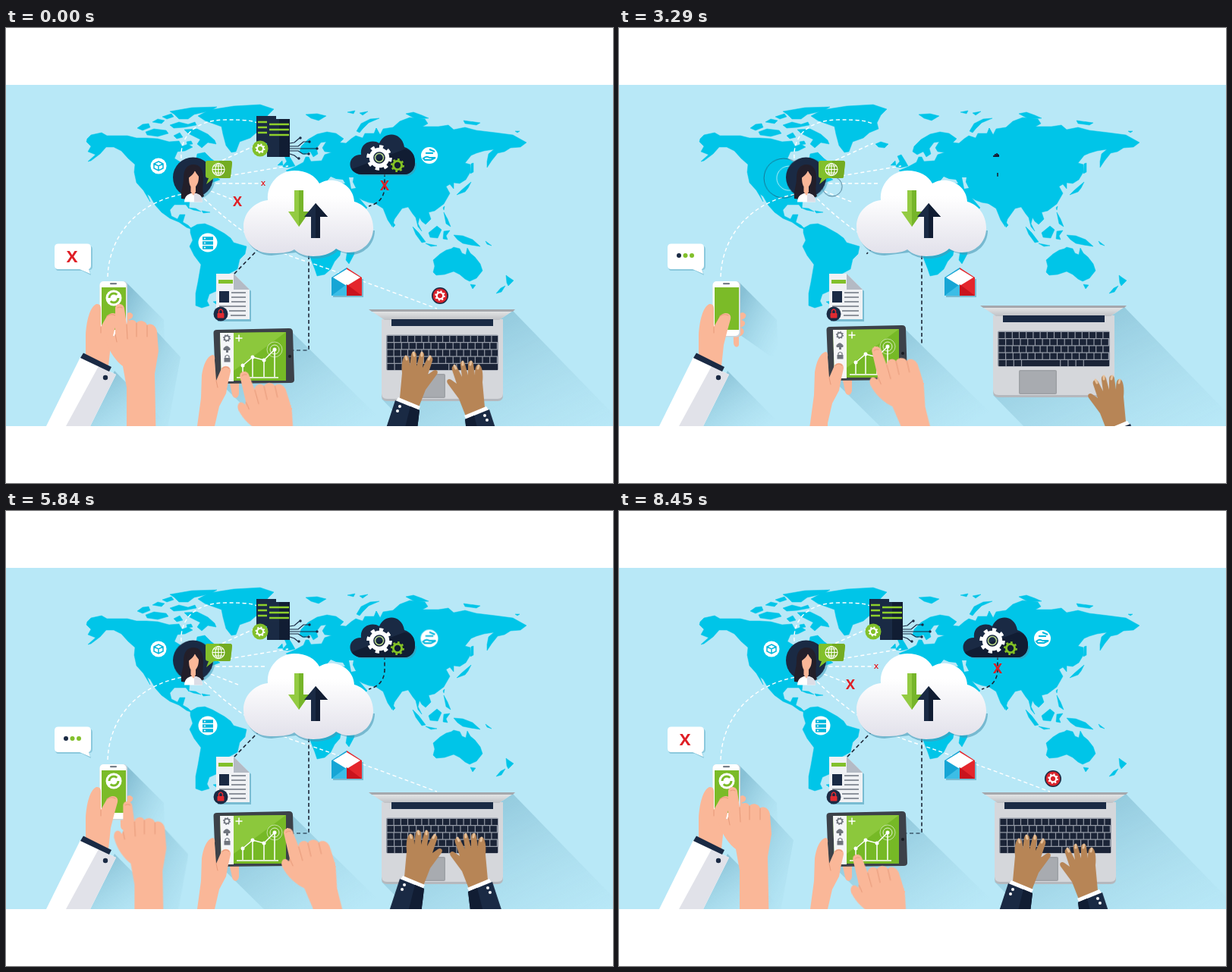
Animation of 800x600 px, one loop 8.48 s. Source, as an HTML page:

```html
<!DOCTYPE html>
<html lang="en">
<head>
<meta charset="utf-8">
<title>Connected world</title>
<style>
html,body{margin:0;width:100%;height:100%;overflow:hidden;background:#fff}
svg{display:block;width:100%;height:100%}
.pop{transform-box:fill-box;transform-origin:center}
.base{transform-origin:50% 100%}
.map{fill:#00c5e8;stroke:#00c5e8;stroke-width:.5;stroke-linejoin:round}
.dash{fill:none;stroke:#fff;stroke-width:1.4;stroke-dasharray:5 3.5}
.dark{stroke:#1c2536;stroke-width:1.6}
.wipe{fill:none;stroke:#fff;stroke-width:8;stroke-dasharray:500 1000}
.x{font:bold 18px "Open Sans","Liberation Sans",sans-serif;fill:#df1f26;text-anchor:middle}
.skin{fill:#fab798}
.fold{fill:none;stroke:#e89c7c;stroke-width:1.1;stroke-linecap:round}
.brown{fill:#b78556}
.navy{fill:#1a2a44}
.deep{fill:#111d33}
.green{fill:#82c02b}
.white{fill:#fff}
.line{fill:none;stroke:#fff;stroke-width:1.5}
.shade{fill:url(#cast)}
</style>
</head>
<body>
<svg viewBox="0 0 800 600">
<defs>
  <clipPath id="band"><rect y="75" width="800" height="450"/></clipPath>
  <linearGradient id="cast" x1="0" y1="0" x2="1" y2="1"><stop offset=".1" stop-color="#5f9fb9" stop-opacity=".55"/><stop offset=".9" stop-color="#8fc8dc" stop-opacity="0"/></linearGradient>
  <linearGradient id="fluff" x1="0" y1="0" x2="0" y2="1"><stop offset=".3" stop-color="#fff"/><stop offset="1" stop-color="#e1e0ea"/></linearGradient>
  <linearGradient id="metal" x1="0" y1="0" x2="0" y2="1"><stop offset="0" stop-color="#eceded"/><stop offset="1" stop-color="#bfc1c5"/></linearGradient>
  <g id="gear" fill="none" stroke="currentColor">
    <circle r="6.6" stroke-width="3.4"/>
    <circle r="9" stroke-width="3" pathLength="16" stroke-dasharray=".9 1.1"/>
  </g>
  <g id="point">
    <path class="skin" d="M-6,6C-6,-2 5,-2 6,6L9,27C10,20 20,19 22,25C25,20 35,22 36,28C41,24 48,29 49,36L51,62L46,92L50,300H9V110L4,82C-4,76 -14,64 -18,48C-19,38 -11,36 -8,43L-6,40Z"/>
    <path class="fold" d="M9,27L10,46M22,25V43M36,28V43M-6,40L-4,50M-3,5Q0,3 3,5"/>
  </g>
  <g id="typist">
    <path class="brown" d="M519,488L522,455C521,445 522,433 527,432C532,432 532,440 532,446L534,431C535,425 541,426 541,432V446L545,431C547,425 552,427 551,433L549,448L555,436C558,430 564,434 562,439L556,457L563,452C568,449 571,454 567,458L553,477L544,500Z"/>
    <path d="M527,433l1,4M537,428l1,4M548,428v4M559,433l-2,4" stroke="#e7c29c" stroke-width="3" stroke-linecap="round"/>
    <path class="white" d="M517,487L546,499L543,505L513,493Z"/>
    <path class="navy" d="M513,491L545,504L537,570H487Z"/>
    <path class="deep" d="M533,499L545,504L537,570H515Z"/>
    <circle class="white" cx="519" cy="499" r="2"/><circle class="white" cx="516" cy="505" r="2"/>
  </g>
  <path id="toPhone" d="M134,328C136,270 178,226 240,218"/>
  <path id="toTop" d="M231,172C229,142 250,121 290,121S325,124 335,126"/>
  <path id="toRack" d="M262,185L335,152"/>
  <path id="toNorth" d="M268,199L372,182"/>
  <path id="toEast" d="M268,205H343"/>
  <path id="toSouth" d="M262,212L306,229"/>
  <path id="toLaptop" d="M255,219C300,264 340,290 390,306S530,356 568,370"/>
  <path id="toDoc" d="M334,290L300,325"/>
  <path id="toTablet" d="M399,300V425H378"/>
  <path id="toDark" d="M499,191V210Q498,230 478,235"/>
  <mask id="whiteMask" maskUnits="userSpaceOnUse" x="0" y="0" width="800" height="600">
    <g class="wipe"><use href="#toPhone" id="w1"/><use href="#toTop" id="w2"/><use href="#toRack" id="w3"/><use href="#toNorth" id="w4"/><use href="#toEast" id="w5"/><use href="#toSouth" id="w6"/><use href="#toLaptop" id="w7"/></g>
  </mask>
  <mask id="darkMask" maskUnits="userSpaceOnUse" x="0" y="0" width="800" height="600">
    <g class="wipe"><use href="#toDoc" id="w8"/><use href="#toTablet" id="w9"/><use href="#toDark" id="w10"/></g>
  </mask>
</defs>

<g clip-path="url(#band)">
<rect y="75" width="800" height="450" fill="#b8e8f7"/>

<g id="world" class="pop"><g class="map">
  <path d="M107,146L112,141 126,138 133,142 145,142 160,142 172,145 185,145 200,146 215,150 228,149 232,156 240,153 246,157 236,162 226,163 222,172 232,178 243,184 250,176 252,166 262,164 270,172 278,178 288,190 275,195 282,200 268,205 258,215 250,220 242,228 241,238 237,233 222,233 216,240 218,248 226,252 229,246 236,246 233,256 240,260 246,266 238,263 228,256 216,251 205,243 197,234 190,222 186,219 190,229 181,214 172,204 169,190 170,180 161,172 152,162 142,157 132,157 124,166 112,175 108,176 118,167 108,163 112,156 106,150Z"/>
  <path d="M173,132L180,127 188,126 190,131 180,135ZM184,137L195,133 211,135 214,139 200,143 186,141ZM193,124L200,120 209,122 205,126ZM206,117L218,113 221,117 212,120ZM216,110L245,105 278,104 270,109 248,114 240,120 228,120 222,114ZM216,128L228,124 240,127 249,124 251,128 235,131 221,132ZM235,134L252,133 266,140 275,148 277,153 266,151 258,158 252,153 256,147 240,139ZM221,142L229,138 233,144 225,146ZM238,150L244,149 246,153 239,154Z"/>
  <path d="M253,116L268,108 300,103 335,101 353,107 345,115 340,125 342,133 330,138 322,145 308,150 303,163 297,164 290,155 286,140 284,130 270,125 262,122ZM338,153L345,150 355,153 350,158 342,157Z"/>
  <path d="M243,264L252,259 262,258 272,262 288,271 296,277 300,283 317,288 315,298 308,305 305,318 292,325 288,335 278,340 277,347 268,351 265,360 268,366 258,369 250,366 250,350 253,335 257,312 248,300 242,288 246,280 243,270ZM273,361L280,360 277,364ZM240,237L250,238 257,242 247,240ZM258,241L269,243 260,244Z"/>
  <path d="M356,217L372,211 384,210 388,217 400,222 408,219 424,222 430,234 440,250 446,256 460,254 456,262 445,278 442,290 440,300 433,308 428,318 420,325 410,327 407,318 400,300 402,288 396,276 397,268 390,264 376,264 362,266 354,258 349,248 351,235ZM450,293L459,289 459,298 452,311 448,306Z"/>
  <path d="M362,211L363,199 376,200 376,192 369,188 381,183 392,177 395,170 399,170 402,176 416,175 420,167 429,164 420,163 417,158 422,150 415,151 409,159 411,166 405,170 401,163 393,167 387,163 389,156 398,147 410,140 423,137 435,139 445,146 440,151 448,152 455,146 461,142 470,145 473,139 485,139 488,132 493,141 500,170 500,236 490,232 478,230 470,227 465,224 476,237 465,247 450,255 444,243 432,222 431,214 418,213 409,213 405,206 402,216 395,205 388,200 396,210 393,214 383,202 375,204 372,211Z"/>
  <path d="M486,139L488,132 493,141 497,133 510,131 519,123 532,118 552,120 556,126 549,130 570,130 583,128 590,134 605,131 620,135 645,138 668,141 686,151 678,157 665,158 657,163 648,165 640,175 634,184 634,176 636,166 643,160 630,162 620,165 613,168 605,178 612,180 612,190 606,200 598,205 590,204 590,212 585,206 580,209 585,218 577,232 565,241 557,243 560,252 553,259 548,255 545,250 543,258 548,268 543,262 540,250 536,245 530,236 522,238 512,252 509,262 503,253 497,238 486,231Z"/>
  <path d="M364,183L370,176 367,169 372,167 377,175 381,182 372,184ZM358,181L364,175 365,181ZM395,114L410,113 422,116 412,122 402,119ZM450,111L460,109 458,113ZM466,112L477,110 470,115ZM462,136L468,126 480,120 492,119 478,125 470,133 466,138ZM527,113L537,111 548,115 557,119 540,120ZM603,122L625,125 620,128 605,126ZM671,136L677,136 674,138Z"/>
  <path d="M613,179L616,178 616,190 612,192ZM607,208L613,203 609,211 605,216 594,220 600,214ZM576,237L578,235 577,240ZM577,243L582,252 586,262 580,258ZM536,262L544,270 553,282 548,283 540,272ZM553,284L568,287 560,288ZM557,270L568,261 574,266 569,277 559,276ZM577,268L585,267 580,274 582,279 576,278ZM590,273L602,274 615,279 625,288 612,286 602,284 595,279ZM632,281L640,287 634,285ZM510,256L513,260 510,263Z"/>
  <path d="M563,306L572,298 580,293 587,291 590,289 598,291 601,297 606,299 608,290 612,297 618,302 625,311 628,320 620,330 611,334 605,331 598,325 590,321 578,325 567,326 563,322 565,314ZM612,338L619,339 615,344ZM659,326L663,329 669,333 662,340 660,336ZM658,340L653,348 646,350 652,343Z"/>
</g>
<path d="M423,202L428,196 435,199 444,200 447,205 436,204ZM452,197L458,197 457,203 461,211 455,212Z" fill="#b8e8f7"/></g>

<g class="dash" mask="url(#whiteMask)"><use href="#toPhone"/><use href="#toTop"/><use href="#toRack"/><use href="#toNorth"/><use href="#toEast"/><use href="#toSouth"/><use href="#toLaptop"/></g>
<g class="dash dark" mask="url(#darkMask)"><use href="#toDoc"/><use href="#toTablet"/><use href="#toDark"/></g>

<g id="orbit" class="pop" fill="none" stroke="#25536e" stroke-width=".7"><circle cx="217" cy="198" r="26"/><circle cx="281" cy="209" r="13"/><circle cx="224" cy="198" r="16" stroke="#fff"/></g>
<g id="disc" class="pop"><circle cx="249" cy="200" r="26" fill="#4ba6c4" opacity=".6"/><circle class="navy" cx="246.500" cy="197" r="26.500"/></g>
<g id="woman" class="pop base">
  <path d="M231,225C230,214 234,208 234,198C234,186 239,180 247,180C256,180 260,187 260,198C260,208 258,214 261,222L252,226H238Z" fill="#231f2a"/>
  <path class="white" d="M235,229.500C235,222 240,219 244,218H250C255,219 259,222 259,229.500Z"/>
  <path d="M248,218H250C255,219 259,222 259,229.500H248Z" fill="#dcdde6"/>
  <path class="skin" d="M241,196C241,186 254,186 254,196C254,203 252,207 250,209V216L247,221 243.500,216V209C242,207 241,203 241,196Z"/>
  <path d="M238,203C238,197 246,196 249,188C251,194 256,195 256,203L259,191 253,183 245,182 237,190Z" fill="#231f2a"/>
</g>
<g id="talk" class="pop"><path class="green" d="M265,175H295Q298,175 298,178L296,196Q296,198 293,198H274L264,206 267,198Q263,198 263,195V178Q263,175 265,175Z"/><path d="M281,175H295Q298,175 298,178L296,196Q296,198 293,198H281Z" fill="#74ac22"/><g class="line" style="stroke-width:1.1"><circle cx="280" cy="186.500" r="8"/><ellipse cx="280" cy="186.500" rx="4" ry="8"/><path d="M272,186.500H288M280,178.500V194.500M273.500,182H286.500M273.500,191H286.500"/></g></g>

<g id="rack" class="pop">
  <path class="navy" d="M330,116H356V152H330ZM344,120H374V170H344Z"/><path class="deep" d="M360,120H374V170H360Z"/>
  <path d="M332,124H344M332,131H344M332,138H344M347,127H373M347,134H373M347,141H373" stroke="#8fd02c" stroke-width="2.500"/>
  <circle class="green" cx="335" cy="159" r="10.500"/><use href="#gear" transform="translate(335 159) scale(.62)" color="#fff"/>
</g>
<g id="wires" fill="none" stroke="#17263f" stroke-width="1.200"><path d="M374,152L380,151 387,145M374,156H385L392,150H399M374,159H410M374,162H385L391,166H398M374,166L380,168 385,172"/><g class="navy" stroke="none"><circle cx="388" cy="145" r="1.700"/><circle cx="400" cy="150" r="1.700"/><circle cx="410" cy="159" r="1.700"/><circle cx="399" cy="166" r="1.700"/><circle cx="386" cy="172" r="1.700"/></g></g>

<g id="darkCloud" class="pop">
  <path d="M471,195L530,195C538,193 541,187 541,178L457,178Q457,194 471,195Z" fill="#4a93ac" opacity=".55"/>
  <path class="navy" d="M469,193C448,192 449,167 468,167C466,151 483,146 492,152C499,135 522,137 525,157C534,160 539,167 539,177C539,187 533,193 525,193Z"/>
  <path class="deep" d="M456,186L525,160C534,160 539,167 539,177C539,187 533,193 525,193H469C463,193 458,190 456,186Z"/>
</g>
<g id="cogs" class="pop"><use href="#gear" transform="translate(492 171) scale(1.600)" color="#fff"/><circle cx="492" cy="171" r="5.500" fill="none" stroke="#b9d98a" stroke-width="1.500"/><use href="#gear" transform="translate(516 181) scale(.85)" color="#84c225"/></g>

<g id="cloud" class="pop">
  <path d="M350,300C330,300 315,284 315,265L486,267C486,286 471,299 454,299L437,294C428,302 416,304 407,304Q390,303 382,296Z" fill="#4b99b6" opacity=".6"/>
  <path fill="url(#fluff)" d="M348,297C328,297 313,281 313,262C313,243 328,229 345,227C343,206 360,188 380,188C396,188 408,195 413,205C430,194 458,205 459,229C474,233 484,247 484,264C484,283 469,296 452,296C445,296 440,294 435,291C428,298 416,301 405,301C395,301 386,298 380,292C372,297 358,297 348,297Z"/>
</g>
<g id="arrows" class="pop">
  <path d="M380,214H392V242H400L386,262 372,242H380Z" fill="#93cb42"/><path d="M386,214H392V242H400L386,262Z" fill="#76b52a"/>
  <path class="navy" d="M402,277H414V249H424L408,231 393,249H402Z"/><path class="deep" d="M408,277H414V249H424L408,231Z"/>
</g>

<g id="doc" class="pop">
  <path d="M279,326H301L323,347V387H279Z" fill="#4f9eba" opacity=".6"/>
  <path d="M277,324H300L321,345V384H277Z" fill="#eff1f4"/><path d="M300,324L321,345H300Z" fill="#b4bac4"/>
  <path class="green" d="M280,332H299V337H280Z"/><path class="navy" d="M281,347H294V362H281Z"/>
  <path d="M297,349H316M297,355H316M297,361H316M281,367H316M294,373H316M296,379H316" stroke="#8d939c" stroke-width="2.200"/>
  <circle class="navy" cx="283" cy="377" r="9.500"/><rect x="278.500" y="376" width="9" height="6.500" rx="1" fill="#e12b31"/><path d="M280.500,376V373Q283,369 285.500,373V376" fill="none" stroke="#e12b31" stroke-width="1.500"/>
</g>

<g id="mail" class="pop">
  <path d="M431,331H471V355H431Z" fill="#4f9eba" opacity=".6"/>
  <path d="M429,329L449,316V353H429Z" fill="#16a5d5"/><path d="M449,316L469,329V353H449Z" fill="#e4262c"/>
  <path class="white" d="M431,329L449,318 467,329 449,340Z"/>
  <path d="M429,353L449,338V353Z" fill="#3cbde6"/><path d="M449,338L469,353H449Z" fill="#c9131d"/>
</g>

<g id="chat" class="pop"><path d="M69,287H109Q114,287 114,292V314Q114,319 110,319L112,326 100,320H69Q65,320 65,314V292Q65,287 69,287Z" fill="#6eb5cb" opacity=".6"/><path class="white" d="M69,284.500H107Q112,284.500 112,289.500V313Q112,317 109,318L111,324 97,318H69Q64,318 64,313V289.500Q64,284.500 69,284.500Z"/></g>
<g id="dots"><circle class="navy" cx="79" cy="300" r="3"/><circle class="green" cx="87.500" cy="300" r="3"/><circle class="green" cx="96" cy="300" r="3"/></g>
<text id="x1" class="x pop" x="87" y="308.500" style="font-size:22px">X</text>
<text id="x2" class="x pop" x="305" y="234.500">X</text>
<text id="x3" class="x pop" x="339" y="208" style="font-size:9px">X</text>
<text id="x4" class="x pop" x="499" y="213.500">X</text>

<g id="cube" class="pop"><circle class="white" cx="201" cy="182" r="10.500"/><path d="M201,176L207,179V185L201,188 195,185V179ZM195,179L201,182 207,179M201,182V188" fill="none" stroke="#00b6dc" stroke-width="1.500"/></g>
<g id="stack" class="pop"><circle class="white" cx="266" cy="283" r="12.500"/><path d="M259,277.500H273M259,283.500H273M259,289.500H273" stroke="#00b6dc" stroke-width="4.500"/><path d="M261,277.500H263M261,283.500H263M261,289.500H263" stroke="#fff" stroke-width="1.500"/></g>
<g id="offer" class="pop"><circle class="white" cx="558" cy="168" r="11"/><path d="M550,172Q554,168 558,171H566L560,174H552ZM553,165H563M558,160L565,163" fill="none" stroke="#00b6dc" stroke-width="2"/></g>
<g id="alert" class="pop"><circle class="navy" cx="572" cy="353" r="11"/><circle cx="572" cy="353" r="9.500" fill="#d9222b"/><use href="#gear" transform="translate(572 353) scale(.65)" color="#fff"/></g>

<g id="phone">
  <path class="shade" d="M159,336L208,385 210,440 160,405Z"/><path class="shade" d="M143,452L215,525H110Z"/>
  <path class="skin" d="M150,379L163,375C170,377 168,383 161,385C168,386 168,393 160,395C167,397 166,405 158,407V418C156,423 151,420 151,415Z"/>
  <rect x="123.500" y="334" width="36.500" height="73.500" rx="5" fill="#c9d5dd"/><rect x="123.500" y="334" width="35" height="72" rx="5" fill="#fff"/>
  <rect x="126" y="342" width="32" height="56" fill="#7bbb28"/><rect x="137" y="336" width="9" height="2.200" rx="1" fill="#777f89"/>
  <g id="sync" class="pop"><circle class="white" cx="142" cy="356" r="10.500"/><circle cx="142" cy="356" r="6" fill="none" stroke="#7bbb28" stroke-width="3" pathLength="8" stroke-dasharray="3 1"/></g>
  <path class="skin" d="M105,432L105,405C106,388 110,368 119,364Q125,363 125,370V394L133,380C139,373 149,376 147,384L142,402 138,418 135,446Z"/>
  <path class="fold" d="M125,394V402M133,380Q138,376 144,379"/>
  <path class="white" d="M98,434L145,457 111,525H53Z"/><path d="M122,446L145,457 111,525H79Z" fill="#e1e2e9"/>
  <path class="navy" d="M102,428.500L139,447 136,453 98,435Z"/><circle class="navy" cx="131" cy="461" r="3.200"/>
</g>
<g id="tapper"><path class="shade" d="M43,30L80,70 60,180H10Z"/><use href="#point"/></g>

<g id="tablet">
  <path class="shade" d="M378,402L490,512 480,535H350L282,468Z"/>
  <path class="skin" d="M294,464H307V482C306,490 299,489 298,483Z"/>
  <path d="M278,398L373,396Q378,396 378,401L380,464Q380,468 375,468L281,469Q276,469 276,465L273.500,402Q273.500,398 278,398Z" fill="#3c4149"/>
  <path d="M282,402L369,401V465H284Z" fill="#76b926"/><path d="M300,402L369,401 300,452Z" fill="#8cc83c"/><path d="M282,402H300V466H284Z" fill="#f5f6f8"/>
  <use href="#gear" transform="translate(291 409) scale(.48)" color="#70757e"/>
  <path d="M287,425a2.500,2.500 0 0 1 1-4a3.500,3.500 0 0 1 6,0a2.500,2.500 0 0 1 1,4ZM290,424h3v4h-3ZM287.500,435h8v5.500h-8Z" fill="#70757e"/><path d="M289,435v-2q2.500,-3 5,0v2" fill="none" stroke="#70757e" stroke-width="1.200"/>
  <path class="line" d="M307,404.500V413.500M302.500,409H311.500"/><circle cx="374" cy="433" r="2" fill="#171b22"/>
  <g class="line"><circle cx="354" cy="424" r="10" style="stroke-width:.8" opacity=".7"/><circle cx="354" cy="424" r="6" style="stroke-width:.8"/><path d="M354,424V460M304,461H359"/></g><circle class="white" cx="354" cy="424" r="2.500"/>
  <g id="chart" class="pop base"><path class="line" d="M312,446V460M325,435V460M340,439V460M312,445L325,434 340,438 354,424"/><circle class="white" cx="312" cy="445" r="2.500"/><circle class="white" cx="325" cy="434" r="2.500"/><circle class="white" cx="340" cy="438" r="2.500"/></g>
  <path class="skin" d="M252,525L257,488 258,458C260,444 265,433 272,431Q276,431 275,438L277,465 284,449C288,443 297,446 296,453L293,466 290,482 281,499 275,525V600H240Z"/>
  <path class="fold" d="M277,465L279,474M285,449Q290,445 294,449"/>
  <circle id="tap1" class="line pop" cx="293" cy="410" r="13" style="stroke-width:12" pathLength="20" stroke-dasharray=".4 2.100"/>
  <circle id="tap2" class="line pop" cx="354" cy="423" r="15" style="stroke-width:7" pathLength="20" stroke-dasharray=".5 2"/>
</g>
<g id="swiper"><g transform="rotate(-13)"><use href="#point"/></g></g>

<g id="laptop">
  <path class="shade" d="M668,373L830,540H545L495,489Z"/>
  <path d="M495,384H655V485Q655,492 648,492H502Q495,492 495,485Z" fill="#b5b8bd"/><path d="M495,384H655V482Q655,489 648,489H502Q495,489 495,482Z" fill="#d5d7db"/>
  <path d="M478,371H671L650,385H499Z" fill="url(#metal)"/><path d="M478,371H671L668,374H482Z" fill="#a5a8ad"/>
  <path class="navy" d="M508,384H642V393H508Z"/>
  <rect x="501" y="404.500" width="148" height="47" rx="2" fill="#949aa6"/>
  <g fill="none" stroke="#1b2437" stroke-width="8"><path stroke-dasharray="8 1.200" d="M502.500,410H648M502.500,428.500H648"/><path stroke-dasharray="8.500 1.200" d="M502.500,419.200H648M502.500,437.700H648"/><path stroke-dasharray="9 1.200 9 1.200 9 1.200 50 1.200" d="M502.500,447H648"/></g>
  <rect x="529" y="456" width="50" height="32" rx="2" fill="#9da0a5"/><rect x="530.500" y="457.500" width="47" height="29" rx="1" fill="#a8abb0"/>
</g>
<g id="left"><use href="#typist"/></g>
<g id="right"><use href="#typist" transform="translate(1150 12) scale(-1 1)"/></g>
</g>
</svg>
<script>
const LOOP = 8480, HOLD = 500;
let css = '';

// Each cycle begins when the still picture clears; steps are [ms, declarations].
function track(id, steps) {
  const at = ms => ((ms - HOLD) / LOOP * 100).toFixed(3) + '%';
  const frames = [[HOLD, steps[0][1]], ...steps, [HOLD + LOOP, steps[steps.length - 1][1]]];
  css += `@keyframes ${id}{${frames.map(([ms, d]) => `${at(ms)}{${d}}`).join('')}}` +
    `#${id}{animation:${id} ${LOOP}ms ease-in-out -${LOOP - HOLD}ms infinite}`;
}
const move = (id, steps) => track(id, steps.map(([ms, x, y]) => [ms, `transform:translate(${x}px,${y}px)`]));
const fade = (id, steps) => track(id, steps.map(([ms, o]) => [ms, `opacity:${o}`]));
const pop = (id, from, to, over = 1.06) => track(id, [
  [from, 'transform:scale(0)'],
  [from + (to - from) * .75, `transform:scale(${over})`],
  [to, 'transform:scale(1)']
]);
// A negative length draws the line from its far end.
const draw = (id, from, to, length) => track(id, [
  [from, `stroke-dashoffset:${length > 0 ? 500 : -500}px`],
  [from + 1, `stroke-dashoffset:${length > 0 ? 500 : length}px`],
  [to, `stroke-dashoffset:${length > 0 ? 500 - length : 0}px`]
]);

track('world', [[1160, 'opacity:0;transform:scale(.9)'], [1560, 'opacity:1;transform:scale(1)']]);

const pops = {
  disc: [1850, 2080], talk: [2450, 2800], cloud: [2250, 2700], arrows: [2650, 3000],
  doc: [2550, 2900], mail: [2750, 3150], chat: [2500, 2850], darkCloud: [3230, 3620],
  rack: [3800, 4230], cogs: [4150, 4560], sync: [3520, 3820], stack: [4600, 4900],
  offer: [5600, 5950], alert: [6050, 6380], x1: [7230, 7500], x2: [7350, 7620],
  x3: [7500, 7770], x4: [7650, 7950]
};
for (const id in pops) pop(id, ...pops[id]);
track('woman', [[1950, 'transform:scale(0)'], [2060, 'transform:scale(.5)'], [2260, 'transform:scale(1.05)'], [2380, 'transform:scale(1)']]);

draw('w2', 2030, 2450, -140);
draw('w3', 2030, 2400, -81);
draw('w4', 1990, 2350, -106);
draw('w5', 1990, 2350, -75);
draw('w6', 2100, 2400, -48);
draw('w1', 2250, 2700, 170);
draw('w7', 3000, 3850, 352);
draw('w8', 3180, 3520, 50);
draw('w9', 3000, 3420, 147);
draw('w10', 3220, 3560, 55);

track('orbit', [[3080, 'opacity:0;transform:scale(.5)'], [3260, 'opacity:1;transform:scale(1)'],
  [3340, 'opacity:.9;transform:scale(1)'], [3520, 'opacity:0;transform:scale(1.1)']]);
fade('wires', [[4250, 0], [4500, 1]]);
fade('cube', [[4980, 0], [5260, 1]]);
fade('dots', [[2880, 0], [3100, 1], [3400, 1], [3980, .18], [4500, 1], [5120, .7], [5800, 1], [6590, .65], [7180, 1], [7240, 0]]);
track('chart', [[2700, 'transform:scaleY(0)'], [3150, 'transform:scaleY(1)'], [3780, 'transform:scaleY(1)'],
  [3900, 'transform:scaleY(0)'], [4250, 'transform:scaleY(0)'], [4750, 'transform:scaleY(1)']]);
const flash = (id, ms) => track(id, [
  [ms - 150, 'opacity:0;transform:scale(.4)'], [ms, 'opacity:.95;transform:scale(1)'], [ms + 200, 'opacity:0;transform:scale(1.3)']
]);
flash('tap1', 3980);
flash('tap2', 6590);

move('phone', [[1400, -60, 210], [1950, 2, -7], [2080, 2, -6], [2400, 0, 0]]);
move('tablet', [[2250, 0, 150], [2750, 0, -6], [3290, 0, -4], [3740, 2, 2], [5200, 2, 2], [5700, 0, 0]]);
move('laptop', [[2300, 0, 190], [2800, -2, -7], [3290, -2, -5], [3720, 0, 0]]);
move('tapper', [[3550, 184, 540], [3980, 170, 419], [4450, 152, 362], [4700, 150, 366], [5120, 149, 353],
  [5600, 150, 364], [6100, 172, 404], [6590, 175, 408], [7200, 172, 406], [7800, 150, 368], [8200, 150, 364]]);
move('swiper', [[2800, 380, 560], [3200, 338, 420], [3400, 338, 420], [3900, 296, 407], [4080, 296, 409],
  [4700, 366, 420], [5120, 372, 416], [5700, 372, 418], [6500, 353, 424], [6700, 353, 426], [7600, 318, 446], [8200, 313, 453]]);
move('left', [[3320, -50, 140], [3800, -3, 0], [4300, 2, -4], [5120, -1, -9], [5800, 6, -6],
  [6590, 10, -15], [7300, 6, -10], [8200, 0, 0]]);
move('right', [[3000, 90, 110], [3290, 37, 19], [3700, 9, -18], [3980, 9, -18], [4500, 5, -14],
  [5120, 9, -20], [5800, 4, -14], [6590, -3, -19], [7300, -2, -12], [8200, 0, 0]]);

const sheet = document.createElement('style');
sheet.textContent = css;
document.head.append(sheet);
</script>
</body>
</html>
```
